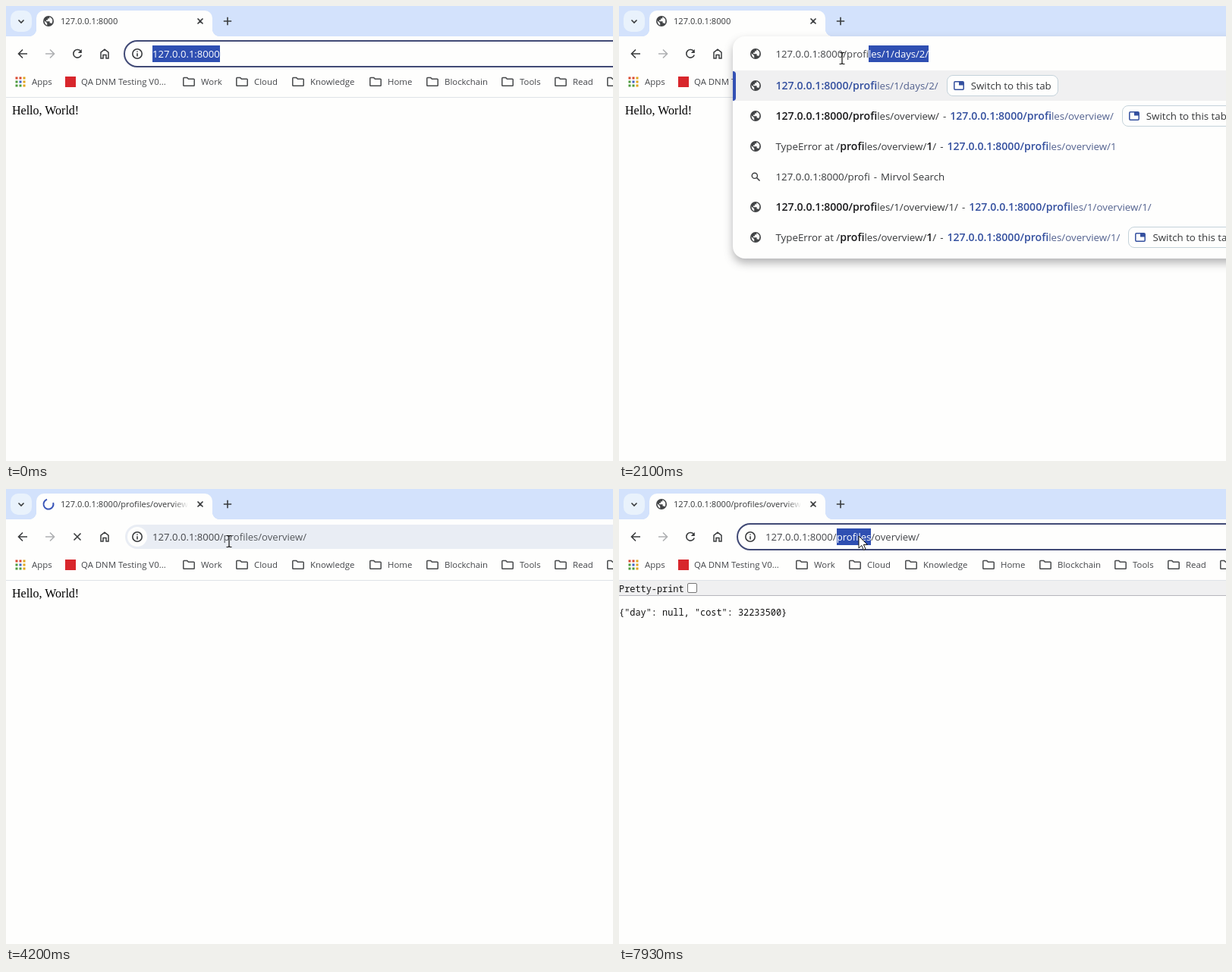
An HTML page for the animation above (8 s loop, 800 by 600 pixels).

```html
<!DOCTYPE html>
<html lang="en">
<head>
<meta charset="utf-8">
<title>Browser address bar</title>
<style>
:root { --paper: #fefefd; --ink: #44464a; --blue: #34509f; --mark: #2f4fb2; }
html, body { margin: 0; width: 100%; height: 100%; overflow: hidden; background: var(--paper); }
#stage { position: relative; width: 800px; height: 600px; overflow: hidden; background: var(--paper);
  font: 13.1px/20px "Open Sans", "Noto Sans", sans-serif; color: var(--ink); white-space: pre; }
:where(#stage) :is(div, svg) { position: absolute; left: 0; top: 0; box-sizing: border-box; }
svg { overflow: visible; fill: none; stroke: #3a3c3e; stroke-width: 1.6; }
b { font-weight: 600; font-size: 14.1px; }
#strip { width: 800px; height: 40px; background: #d3e2fc; }
#search { left: 6px; top: 6px; width: 28px; height: 28px; border-radius: 10px; background: #e9f2fc; }
#tab { left: 40px; top: 6px; width: 232px; height: 35px; border-radius: 10px 10px 0 0; background: var(--paper); }
#tab::before, #tab::after { content: ""; position: absolute; bottom: 1px; width: 10px; height: 10px; }
#tab::before { left: -10px; background: radial-gradient(circle at 0 0, transparent 10px, var(--paper) 10.5px); }
#tab::after { right: -10px; background: radial-gradient(circle at 100% 0, transparent 10px, var(--paper) 10.5px); }
#title { left: 72px; top: 10px; width: 168px; overflow: hidden; font-size: 11.1px; color: #36383a;
  -webkit-mask: linear-gradient(90deg, #000 88%, transparent); mask: linear-gradient(90deg, #000 88%, transparent); }
#omni { left: 155px; top: 45px; width: 700px; height: 36px; border: 2px solid transparent;
  border-radius: 18px; background: #e9edf4 padding-box; }
#omni.hover { background-color: #dde1e8; }
#omni.focus { background-color: var(--paper); border-color: #414a76; }
#info { left: 160px; top: 50px; width: 26px; height: 26px; border-radius: 50%; background: var(--paper); }
#url { left: 193px; top: 52px; line-height: 22px; z-index: 3; }
#url.open { left: 206.5px; }
#url mark { display: inline-block; height: 22px; background: var(--mark); color: #fff; }
#url u { display: inline-block; width: 1px; height: 19px; margin: 0 -1px 0 0; background: #111; vertical-align: middle; }
#url s { color: #55585c; text-decoration: none; }
.fav { font-size: 11.4px; top: 90px; }
#line { top: 120px; width: 800px; height: 1px; background: #dfe3e8; }
#hello { left: 8px; top: 129px; font: 16px/18px "Liberation Serif", serif; color: #000; }
#json { top: 121px; width: 800px; height: 60px; font: 11.9px/20px "Noto Sans Mono", monospace; color: #111; }
#bar { width: 800px; height: 20px; background: #f0f0f1; border-bottom: 1px solid #b6b6bc; }
#box { left: 90px; top: 3px; width: 13px; height: 13px; border: 1px solid #767676; border-radius: 2px; background: #fff; }
#drop { left: 150px; top: 40px; width: 680px; border-radius: 16px; background: var(--paper);
  box-shadow: 0 6px 12px rgba(90, 92, 96, .45); z-index: 2; overflow: hidden; }
#drop .row { width: 680px; height: 40px; line-height: 40px; padding-left: 56.5px; font-size: 13.3px; color: #36383a; }
#drop .row:nth-child(1) { background: #f0f0f1; }
#drop .row:nth-child(1)::before { content: ""; position: absolute; left: 0; top: 1px; width: 4px; height: 39px;
  border-radius: 0 4px 4px 0; background: #3350b4; }
#drop b { color: #1a1a1c; }
#drop i { font-style: normal; padding: 0 5px; }
#drop .link { color: #53628f; }
#drop .link b { color: var(--blue); }
#drop .chip { display: inline-block; box-sizing: border-box; width: 147px; height: 28px; margin-left: 11px;
  padding-left: 31px; line-height: 26px; border: 1px solid #c4d2da; border-radius: 8px;
  background: var(--paper); position: relative; vertical-align: middle; top: -1px; }
#drop .chip svg { left: 8px; top: 7px; stroke: var(--blue); }
#ibeam, #arrow { z-index: 4; }
</style>
</head>
<body>
<div id="stage">
  <div id="strip"></div>
  <div id="search"></div>
  <div id="tab"></div>
  <div id="title"></div>
  <div id="omni"></div>
  <svg id="chrome" width="800" height="120">
    <defs>
      <g id="globe" stroke="none">
        <circle r="7" fill="#424446"/>
        <path fill="#fefefd" d="M-5.4-.8L-1.8 2.6V5.4Q-5.4 4-5.4-.8ZM1.2-5.4V-3.4H-1V-1.4H-3V.2H1.6V2.4H3.4L4.2 3.6Q6.2.4 5 -2.4Q3.6-5 1.2-5.4Z"/>
      </g>
      <path id="folder" d="M.8-4.6Q.8-5.4 1.6-5.4H5.8L7.4-3.8H14.4Q15.2-3.8 15.2-3V4.4Q15.2 5.2 14.4 5.2H1.6Q.8 5.2.8 4.4Z" stroke-width="1.5"/>
    </defs>
    <path d="M16.5 18.5L20 22L23.5 18.5M252.5 16.5L259.5 23.5M259.5 16.5L252.5 23.5M292 14.8V25.2M286.8 20H297.2"/>
    <use id="tabGlobe" href="#globe" x="56" y="20"/>
    <path id="spinner" d="M0-6.5A6.5 6.5 0 1 1-6.5 0" stroke="#3a55b8" stroke-width="2"/>
    <path d="M28 63H16.5M22 57.5L16.5 63L22 68.5"/>
    <path d="M52 63H63.5M58 57.5L63.5 63L58 68.5" stroke="#aeb0b2"/>
    <g id="reload"><path d="M98.6 60A5.3 5.3 0 1 0 99.2 64.4"/><path d="M99.8 57V62H94.8Z" fill="#3a3c3e" stroke="none"/></g>
    <path id="stop" d="M89.5 58.5L98.5 67.5M98.5 58.5L89.5 67.5"/>
    <path d="M125 61.2L130 57.2L135 61.2V69H132V64.5H128V69H125Z" stroke-width="1.5"/>
    <rect x="78" y="93" width="14" height="14" fill="#d8262c" stroke="none"/>
  </svg>
  <div id="info"><svg width="26" height="26" stroke-width="1.5"><circle cx="13" cy="13" r="6.2"/><path d="M13 12.2V16.4M13 9.4V10.8"/></svg></div>
  <div class="fav" style="left:34px">Apps</div>
  <div class="fav" style="left:99px">QA DNM Testing V0...</div>
  <div id="line"></div>
  <div id="hello">Hello, World!</div>
  <div id="json"><div id="bar">Pretty-print<div id="box"></div></div><div style="top:31px">{"day": null, "cost": 32233500}</div></div>
  <div id="drop"></div>
  <div id="url"></div>
  <svg id="ibeam" width="1" height="1"><path d="M-3.5-7.5H-1L0-6.5L1-7.5H3.5M0-6.5V6.5M-3.5 7.5H-1L0 6.5L1 7.5H3.5" stroke="#111" stroke-width="1.2"/></svg>
  <svg id="arrow" width="1" height="1"><path d="M0 0V16L3.8 12.4L6.4 18.4L9 17.2L6.4 11.4H11.4Z" fill="#fff" stroke="#111" stroke-width="1"/></svg>
</div>
<script>
const LOOP = 8000;
const $ = id => document.getElementById(id);
const host = '127.0.0.1:8000', path = host + '/profiles/overview/';

// Bookmarks bar
const folders = { Work: 233, Cloud: 303, Knowledge: 377, Home: 479, Blockchain: 554, Tools: 653, Read: 723, '': 792 };
let icons = '';
for (const [name, x] of Object.entries(folders)) {
  icons += `<use href="#folder" x="${x}" y="100" stroke="#484a4c"/>`;
  $('line').insertAdjacentHTML('beforebegin', `<div class="fav" style="left:${x + 24}px">${name}</div>`);
}
const dots = ['#d8482e', '#d8482e', '#e0a41c', '#4c9a3c', '#3f62c4', '#e0a41c', '#4c9a3c', '#4c9a3c', '#e0a41c'];
dots.forEach((c, i) => {
  icons += `<rect x="${12.5 + i % 3 * 5}" y="${93.5 + (i / 3 | 0) * 5}" width="3" height="3" fill="${c}" stroke="none"/>`;
});
$('chrome').insertAdjacentHTML('beforeend', icons);

// Suggestions: [title, link, has a switch chip]
const home = [host, host, 1];
const days = ['', host + '/profiles/1/days/2/', 1];
const view = [path, path, 1];
const err = ['TypeError at /profiles/overview/1/', path + '1'];
const errTab = [err[0], path + '1/', 1];
const nested = [host + '/profiles/1/overview/1/', host + '/profiles/1/overview/1/'];
const bare = ['127.0.0.1', path.slice(0, -1)];
const find = null;

const first = [home, days, view, find, err, nested, errTab];
const some = [days, view, err, find, nested, errTab];
const more = [days, view, err, find, nested, errTab, bare];
const last = [view, err, bare, find, errTab];

// Typing: [start, typed path, suggestions]
const typing = [
  [1330, '', first], [1600, 'p', some], [1700, 'pr', some], [1800, 'pro', some], [1900, 'prof', some],
  [2080, 'profi', some], [2270, 'profil', some], [2430, 'profile', more], [2600, 'profiles', more],
  [3000, 'profiles/', more], [3120, 'profiles/o', last], [3310, 'profiles/ov', last],
  [3470, 'profiles/ove', last], [3600, 'profiles/over', last]
];

function embolden(text, typed) {
  if (text.startsWith('Type')) {
    const words = typed.split('/').filter(Boolean);
    for (const w of words) text = text.replace('/' + w, `/<b>${w}</b>`);
    return text.replace(/\/1\/$/, '/<b>1</b>/');
  }
  const query = host + '/' + typed;
  let n = 0;
  while (n < text.length && text[n] === query[n]) n++;
  return `<b>${text.slice(0, n)}</b>${text.slice(n)}`;
}

const chip = '<span class="chip"><svg width="14" height="12"><rect x=".8" y=".8" width="12.4" height="10.4" rx="1.2" stroke-width="1.5"/>' +
  '<path d="M7 1H13V5.5H7Z" fill="#34509f" stroke="none"/></svg>Switch to this tab</span>';
const globeAt = y => `<svg style="left:30px;top:${y}px" width="1" height="1"><use href="#globe"/></svg>`;
const lens = '<svg style="left:30px;top:20px" width="1" height="1"><circle cx="-1.2" cy="-1.2" r="3.6" stroke-width="1.4"/><path d="M1.5 1.5L5.5 5.5"/></svg>';

function rowHtml(item, i, typed) {
  const body = item
    ? globeAt(20) + (item[0] ? embolden(item[0], typed) + '<i>-</i>' : '') +
      `<span class="link">${embolden(item[1], typed)}</span>` + (item[2] ? chip : '')
    : `${lens}${host}/${typed}<i>-</i>Mirvol Search`;
  return `<div class="row" style="top:${45 + i * 40}px">${body}</div>`;
}

function setHtml(el, html) {
  if (el.memo !== html) el.innerHTML = el.memo = html;
}
const show = (id, on) => { $(id).style.display = on ? '' : 'none'; };
const mark = s => `<mark>${s}</mark>`;

function urlHtml(t, step) {
  if (step) {
    const typed = step[1];
    const full = (step[2] === last ? path : days[1]).slice(host.length + 1);
    return `${host}/${typed}` + (typed ? mark(full.slice(typed.length)) : '<u></u>');
  }
  if (t < 1130) return mark(host);
  if (t < 1330) return host + '<u></u>';
  if (t < 7430) return `${host}<s>${path.slice(host.length)}</s>`;
  if (t < 7900) return mark(path);
  return `${host}/${mark('profiles')}/overview/`;
}

// Pointer stops: [time, x, y]
const stops = [[530, 294, 69], [5970, 294, 69], [6170, 317, 56], [6370, 317, 56], [6430, 318, 59],
  [7000, 318, 59], [7070, 316, 62], [8000, 316, 62]];
function pointer(t) {
  const i = Math.max(1, stops.findIndex(s => s[0] > t));
  const [a, b] = [stops[i - 1], stops[i]];
  const k = Math.max(0, (t - a[0]) / (b[0] - a[0]));
  return [1, 2].map(n => Math.round(a[n] + (b[n] - a[n]) * k));
}

function draw(t) {
  const step = t < 4100 ? typing.filter(s => s[0] <= t).pop() : null;
  const loading = t >= 4130 && t < 4930, loaded = t >= 4930;

  show('drop', step);
  if (step) {
    const [, typed, items] = step;
    $('drop').style.height = 53 + items.length * 40 + 'px';
    setHtml($('drop'), items.map((r, i) => rowHtml(r, i, typed)).join('') + globeAt(23));
  }
  setHtml($('url'), urlHtml(t, step));
  $('url').className = step ? 'open' : '';
  $('omni').className = t < 4100 || t >= 7430 ? 'focus' : t >= 6030 ? 'hover' : '';

  setHtml($('title'), t < 4130 ? host : path);
  show('tabGlobe', !loading);
  show('spinner', loading);
  $('spinner').setAttribute('transform', `translate(56 20) rotate(${t * .36})`);
  show('reload', !loading);
  show('stop', loading);
  show('hello', !loaded);
  show('json', loaded);

  const [x, y] = pointer(t), overMark = t >= 7430;
  show('ibeam', t >= 530 && !overMark);
  show('arrow', overMark);
  for (const id of ['ibeam', 'arrow']) $(id).style.transform = `translate(${x}px, ${y}px)`;
}

const start = performance.now();
function tick() {
  draw((performance.now() - start) % LOOP);
  requestAnimationFrame(tick);
}
tick();
</script>
</body>
</html>
```
